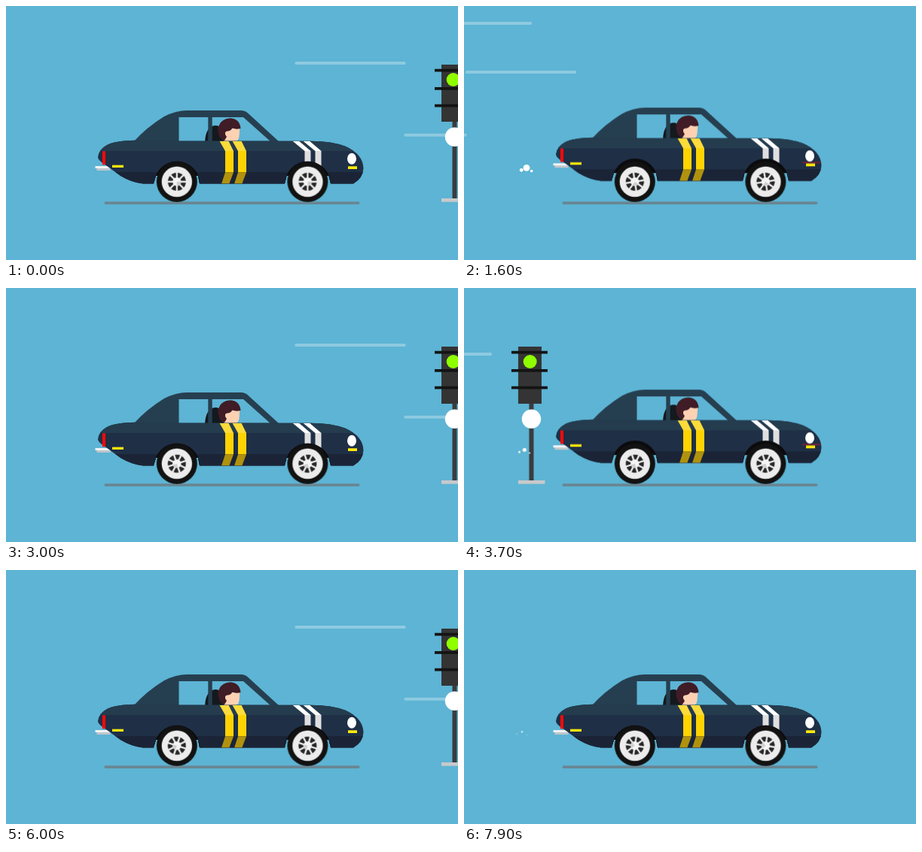
Recreate the animation shown at these times as an HTML page. Size 600x338 px, loop 8 s.

```html
<!DOCTYPE html>
<html lang="en">
<head>
<meta charset="utf-8">
<title>Driving car</title>
<style>
  html, body { margin: 0; width: 100%; height: 100%; overflow: hidden; background: #5db4d4; }
  svg { display: block; width: 100%; height: 100%; }

  /* Everything advances ten times a second. */
  .streaks { animation: streak 1s steps(10, end) infinite; }
  .signal { animation: pass 8s steps(10, end) infinite; }
  .spin { animation: spin 1s steps(10, end) infinite; }
  .body { animation: bounce .5s step-end infinite; }
  .glint { animation: glint .5s step-end infinite; }
  .puff { animation: drift 1s step-end infinite; }
  .puff circle { transform-box: fill-box; transform-origin: center; animation: shrink 1s step-end infinite; }

  @keyframes streak { to { transform: translateX(-1120px); } }
  @keyframes spin { to { transform: rotate(360deg); } }
  @keyframes pass {
    0%, 37.5%, 75% { transform: translateX(506px); }
    12.5%, 37.499%, 50%, 74.999%, 87.5%, 100% { transform: translateX(-217px); }
  }
  @keyframes bounce {
    0%, 80%, 100% { transform: translateY(0); }
    20% { transform: translateY(-3.7px); }
    60% { transform: translateY(-1.8px); }
  }
  @keyframes glint {
    0%, 60%, 100% { opacity: 0; }
    20% { opacity: 1; }
  }
  @keyframes drift {
    0%, 30% { transform: translateX(113px); }
    40% { transform: translateX(97px); }
    50% { transform: translateX(88px); }
    60% { transform: translateX(83px); }
    70% { transform: translateX(80.3px); }
    80% { transform: translateX(78.5px); }
    90%, 100% { transform: translateX(77px); }
  }
  @keyframes shrink {
    0%, 100% { transform: scale(0); }
    30% { transform: scale(.4); }
    40% { transform: scale(.8); }
    50% { transform: scale(1); }
    70% { transform: scale(.57); }
    80% { transform: scale(.38); }
    90% { transform: scale(.25); }
  }
</style>
</head>
<body>
<svg viewBox="0 0 600 338" preserveAspectRatio="none">
  <defs>
    <path id="shell" d="M122 201Q123 191 134 185Q146 179 172 178.800L176 179.700H405Q433 180 450 186.500Q474 197 474.500 216Q474 229 461 236.500H431L428.500 226H372.500L370 236.500H257L255 226H199L196 236.500H182Q167 235 152 226L130 210Q122 205 122 201Z"/>
    <clipPath id="shellClip"><use href="#shell"/></clipPath>
    <g id="wheel">
      <circle r="27" fill="#121212"/>
      <circle r="20.200" fill="#ececec"/>
      <g class="spin">
        <circle r="12" fill="#262626"/>
        <g stroke="#ececec" stroke-width="2.300">
          <path id="spokes" d="M0-12.500V12.500M-12.500 0H12.500"/>
          <use href="#spokes" transform="rotate(45)"/>
        </g>
        <circle r="5.700" fill="#f4f4f4"/>
        <path d="M0 0L5.700 0A5.700 5.700 0 0 1 0 5.700Z" fill="#d0d0d0"/>
      </g>
    </g>
    <g id="yellowStripe">
      <path fill="#fddb3a" d="M283.500 179.700H295.500L302 193H291Z"/>
      <path fill="#ffd300" d="M291 193H302V221.300H291Z"/>
      <path fill="#b0920f" d="M291 221.300H302L296.300 236.500H286Z"/>
    </g>
    <g id="whiteStripe">
      <path fill="#fff" d="M380.500 179.700H389L404.500 193H396.500Z"/>
      <path fill="#dfdfe0" d="M396.500 193H404.500V221H396.500Z"/>
    </g>
  </defs>

  <rect width="600" height="338" fill="#5db4d4"/>

  <g class="streaks" fill="#fff" fill-opacity=".3">
    <rect x="383.500" y="74" width="147" height="4" rx="1.500"/>
    <rect x="528.500" y="169.700" width="147" height="4" rx="1.500"/>
    <rect x="615" y="21" width="147" height="4" rx="1.500"/>
    <rect x="674" y="86" width="147" height="4" rx="1.500"/>
  </g>

  <g class="signal">
    <rect x="86.500" y="150" width="6" height="107" fill="#3a3b3d"/>
    <rect x="72" y="256" width="35.500" height="4.700" fill="#c8c9cb"/>
    <rect x="72" y="78" width="31" height="76" fill="#343435"/>
    <path d="M63 85.700H111M63 109.800H111M63 132.700H111" stroke="#141414" stroke-width="3.800"/>
    <circle cx="87.700" cy="98" r="9" fill="#8fff00"/>
    <circle cx="89.500" cy="174.300" r="12.700" fill="#fff"/>
  </g>

  <rect x="130.500" y="260.200" width="339" height="3.800" rx="1.900" fill="#698694"/>

  <g class="puff" fill="#fff">
    <circle cx="-6.800" cy="218.300" r="2.400"/>
    <circle cx="0" cy="215.400" r="4.400"/>
    <circle cx="6.700" cy="219.600" r="1.800"/>
  </g>

  <g class="body">
    <!-- tailpipe -->
    <rect x="118.500" y="213" width="20" height="3" fill="#f2f3f4"/>
    <rect x="120.500" y="216" width="18" height="3" fill="#bfc6cb"/>

    <!-- seat and driver -->
    <path d="M264 181Q265 160 278 159Q289 159 289 181Z" fill="#14191e"/>
    <path d="M290 163H310.300L309.500 174Q308.500 181 301 181H290Z" fill="#ffd1b3"/>
    <path d="M282.500 171Q280 163 283 158.500Q287 149.500 298 149.300Q310.500 150.500 311.500 163Q305 164.500 300.500 162.500Q298.500 166 295 166.500Q292 166 291 169Q291 172 293 174L290 179Q284 177 282.500 171Z" fill="#401c26"/>
    <circle cx="293.700" cy="169.500" r="2.700" fill="#ffd1b3"/>

    <!-- cabin with open windows -->
    <path fill="#263f50" fill-rule="evenodd" d="M169 181Q187 161 210 147Q226 139 240 139H312Q317.500 139 321 142.500L363 181ZM229.500 148V179.800H268.300V148ZM273.700 148V179.800H350.500L315 148Z"/>

    <use href="#shell" fill="#1f2f46"/>
    <g clip-path="url(#shellClip)">
      <rect x="120" y="178" width="360" height="15" fill="#243c4e"/>
      <rect x="120" y="221" width="360" height="17" fill="#1a2436"/>
      <use href="#yellowStripe"/>
      <use href="#yellowStripe" x="17"/>
      <use href="#whiteStripe"/>
      <use href="#whiteStripe" x="14"/>
      <circle cx="227" cy="237" r="30.300" fill="#0b0b0d"/>
      <circle cx="400.500" cy="237" r="30.300" fill="#0b0b0d"/>
    </g>

    <rect x="128" y="193.300" width="4" height="18" fill="#fb0909"/>
    <rect x="141" y="211.700" width="15" height="3.300" fill="#ffe90a"/>
    <path class="glint" d="M449 212H473.500" stroke="#a81b28" stroke-width="1.200"/>
    <ellipse cx="459" cy="203.300" rx="6" ry="7.500" fill="#fff"/>
    <rect x="454" y="213.300" width="12" height="3.700" fill="#ffe90a"/>
  </g>

  <use href="#wheel" x="226.800" y="233.800"/>
  <use href="#wheel" x="400.400" y="233.800"/>
</svg>
</body>
</html>
```
